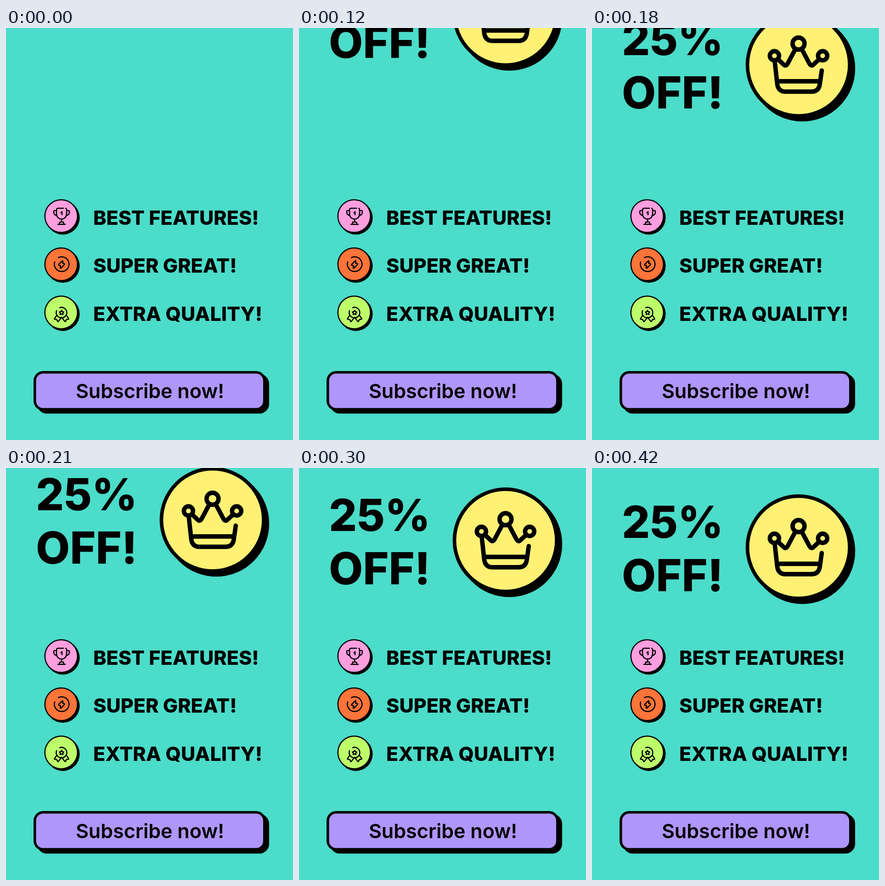
An HTML page with a canvas for the animation above (450 ms loop, 625 by 896 pixels).

```html
<!DOCTYPE html>
<html lang="en">
<head>
<meta charset="utf-8">
<title>25% OFF!</title>
<style>
  html, body { margin: 0; width: 100%; height: 100%; overflow: hidden; background: #4bdcca; }
  canvas { display: block; }
</style>
</head>
<body>
<canvas id="stage" width="625" height="896"></canvas>
<script>
const ctx = document.getElementById('stage').getContext('2d');
const STEP = 30;
// Distance of the header above its resting place, one value per step.
const LIFT = [300, 294, 283, 256, 203, 142, 92.5, 59.5, 38, 24, 15, 8.5, 4, 1.3, 0];

function disc(x, y, r, color) {
  ctx.fillStyle = color;
  ctx.beginPath();
  ctx.arc(x, y, r, 0, Math.PI * 2);
  ctx.fill();
}

function badge(x, y, radius, border, shadow, color) {
  disc(x + shadow, y + shadow, radius, '#000');
  disc(x, y, radius, '#000');
  disc(x, y, radius - border, color);
}

function panel(x, y, w, h, r, color) {
  ctx.fillStyle = color;
  ctx.beginPath();
  ctx.roundRect(x, y, w, h, r);
  ctx.fill();
}

function text(str, x, y, size, weight, align = 'left') {
  ctx.font = `${weight} ${size}px Inter, sans-serif`;
  ctx.textAlign = align;
  ctx.fillStyle = '#000';
  ctx.fillText(str, x, y);
}

// Strokes path data relative to the point (x, y).
function icon(x, y, width, data) {
  ctx.save();
  ctx.translate(x, y);
  ctx.lineWidth = width;
  ctx.lineCap = ctx.lineJoin = 'round';
  ctx.strokeStyle = '#000';
  ctx.stroke(new Path2D(data));
  ctx.restore();
}

const ring = (x, y, r) => `M${x + r} ${y}a${r} ${r} 0 1 1 ${-2 * r} 0a${r} ${r} 0 1 1 ${2 * r} 0`;

const CROWN = ring(0, -46, 13) + ring(-52.5, -19.5, 10) + ring(52.5, -19.5, 10) +
  'M-52-9L-46.5 41Q-44.5 58.5-28 58.5H28Q44.5 58.5 46.5 41L50.5 12.5' +
  'M-45 36H47' +
  'M-45-12L-33-1Q-27.5 5-23.5-3L-7-34M7-34L23.5-3Q27.5 5 33-1L45-12';

const TROPHY = 'M4-17H-7Q-11-17-11-13V-5C-11 2-6 6.5 0 6.5S11 2 11-5V-13Q11-16 9-17' +
  'M-12-12H-15Q-17-12-17-9Q-17-2-10-1M12-12H15Q17-12 17-9Q17-2 10-1' +
  'M0 7V13M-5 18L-4 13H4L5 18M-8 18H8M-1.5-7L1-9.5V-3';

const BOLT = 'M-7-14.5A16 16 0 1 1-15-5' +
  'M1-7L-6 0Q-7.5 2-5 2.5L-2 3.5L-3 7Q-3 9.5-1 8L6 1Q7.5-1 5-1.5L2-2.5L3-6Q3-8.5 1-7Z';

const MEDAL = 'M-4-10.5A11.5 11.5 0 1 1-10.8-4' +
  'M0-4.5L1.6-1.7L4.8-1L2.6 1.4L3 4.6L0 3.3L-3 4.6L-2.6 1.4L-4.8-1L-1.6-1.7Z' +
  'M-10.5 6L-15.5 13.5Q-16 15-14 15L-10.5 15.5L-9 19Q-8 21-6.5 19L0 10.5L6.5 19Q8 21 9 19L10.5 15.5L14 15Q16 15 15.5 13.5L10.5 6';

const FEATURES = [
  { label: 'BEST FEATURES!', color: '#ff9fdf', mark: TROPHY },
  { label: 'SUPER GREAT!', color: '#ff7438', mark: BOLT },
  { label: 'EXTRA QUALITY!', color: '#bdff6b', mark: MEDAL },
];

function header(lift) {
  ctx.save();
  ctx.translate(0, -lift);
  text('25%', 65, 151.5, 96, 800);
  text('OFF!', 65, 267.5, 96, 800);
  badge(449.8, 172.4, 115.2, 7.8, 8.2, '#fff174');
  icon(449.8, 172.4, 9.6, CROWN);
  ctx.restore();
}

function feature({ label, color, mark }, row) {
  const y = 409 + row * 104.8;
  badge(120.2, y, 36.8, 2.5, 3.5, color);
  icon(121, y, 2.5, mark);
  text(label, 190, y + 18.6, 43, 800);
}

function button() {
  panel(67.5, 752.5, 505.5, 86, 21, '#000');
  panel(60, 746, 505.5, 86, 21, '#000');
  panel(65.5, 751.5, 494.5, 75, 15.5, '#ae96fb');
  text('Subscribe now!', 313.5, 804.5, 43, 600, 'center');
}

function draw(now) {
  ctx.fillStyle = '#4bdcca';
  ctx.fillRect(0, 0, 625, 896);
  header(LIFT[Math.floor(now / STEP) % LIFT.length]);
  FEATURES.forEach(feature);
  button();
  requestAnimationFrame(draw);
}
requestAnimationFrame(draw);
</script>
</body>
</html>
```
